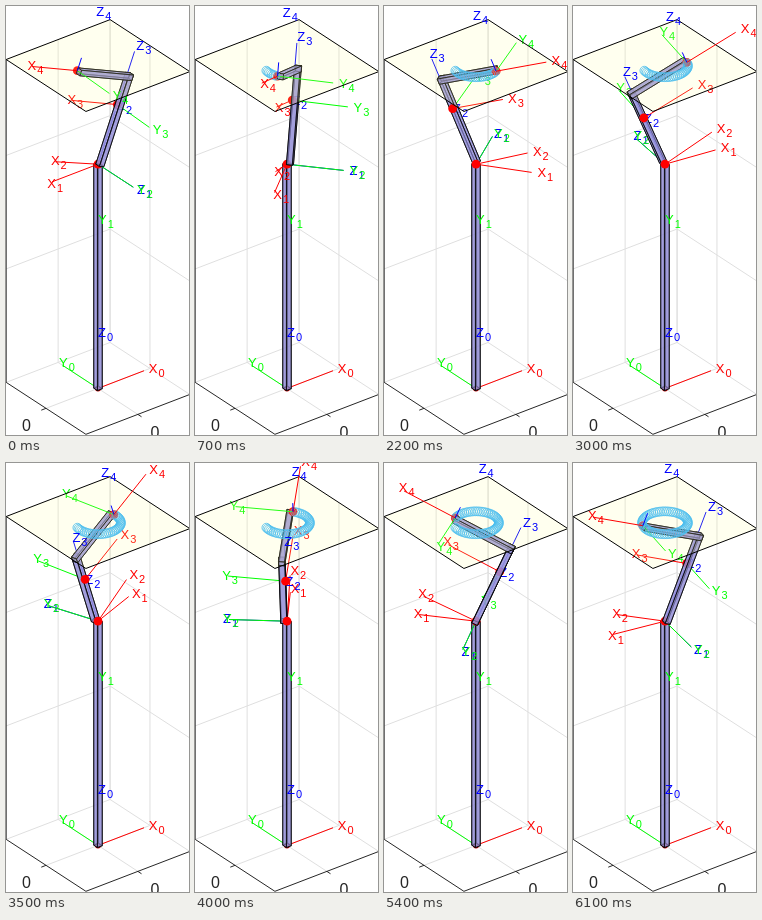
Recreate the animation shown at these times as an HTML page with a canvas. Size 183 by 429 pixels, loop 6200 ms.

```html
<!DOCTYPE html>
<html lang="en">
<head>
<meta charset="utf-8">
<title>Robot arm tracing a circle</title>
<style>
html, body { margin: 0; width: 100%; height: 100%; overflow: hidden; background: #fff; }
canvas { display: block; width: 183px; height: 429px; }
</style>
</head>
<body>
<canvas id="stage"></canvas>
<script>
const W = 183, H = 429, STEP = 100, STEPS = 62;
const RAD = Math.PI / 180;
const HALF = 65.5, TOP = 372.8, SHOULDER = 258.9;
const TILT = 22 * RAD, TWIST = -4.3 * RAD;
const SLIDE = 65, REACH = 97, TOOL = 63.5;
const AXIS = 58, LABEL = 64, THICK = 3, ASIDE = 3;
const RED = '#f00', GREEN = '#0f0', BLUE = '#00f';

const canvas = document.getElementById('stage');
const ctx = canvas.getContext('2d');
const ratio = window.devicePixelRatio || 1;
canvas.width = W * ratio;
canvas.height = H * ratio;
ctx.scale(ratio, ratio);

// Orthographic view: azimuth -37.5, elevation 30
const CA = Math.cos(37.5 * RAD), SA = Math.sin(37.5 * RAD);
const project = ([x, y, z]) => [
  92 + CA * x - SA * y,
  382.4 - 0.5 * (SA * x + CA * y) - 0.866 * z
];
// Distance away from the viewer
const depth = ([x, y, z]) => 0.866 * (SA * x + CA * y) - 0.5 * z;

const add = (p, v, k = 1) => p.map((c, i) => c + v[i] * k);
const mix = (a, u, b, v) => u.map((c, i) => a * c + b * v[i]);

function path(points, closed) {
  ctx.beginPath();
  points.forEach(p => ctx.lineTo(...project(p)));
  if (closed) ctx.closePath();
}

function line(p, q, color) {
  path([p, q]);
  ctx.strokeStyle = color;
  ctx.lineWidth = 1;
  ctx.stroke();
}

function dot(p, color = RED, r = 4.4) {
  ctx.beginPath();
  ctx.arc(...project(p), r, 0, 2 * Math.PI);
  ctx.fillStyle = color;
  ctx.fill();
}

function label(p, dir, letter, index, color) {
  const [x, y] = project(add(p, dir, LABEL));
  ctx.fillStyle = color;
  ctx.textAlign = 'left';
  ctx.textBaseline = 'alphabetic';
  ctx.font = '13px "Liberation Sans", Arial, sans-serif';
  ctx.fillText(letter, x, y + 4);
  const w = ctx.measureText(letter).width;
  ctx.font = '11px "Liberation Sans", Arial, sans-serif';
  ctx.fillText(index, x + w + 1, y + 8);
}

function axis(p, dir, letter, index, color, length = AXIS) {
  line(p, add(p, dir, length), color);
  label(p, dir, letter, index, color);
}

const FACES = ['0123', '4567', '0154', '1265', '2376', '3047'];

function beam(p, q, u, v) {
  const ring = c => [[1, 1], [1, -1], [-1, -1], [-1, 1]]
    .map(([a, b]) => add(add(c, u, a * THICK), v, b * THICK));
  const corners = [...ring(p), ...ring(q)];
  const far = face => face.reduce((sum, c) => sum + depth(c), 0);
  const faces = FACES.map(f => [...f].map(i => corners[i]));
  faces.sort((a, b) => far(b) - far(a));
  for (const face of faces) {
    path(face, true);
    ctx.fillStyle = 'rgba(150,145,215,.65)';
    ctx.fill();
    ctx.strokeStyle = '#000';
    ctx.lineWidth = 0.8;
    ctx.stroke();
  }
}

function room() {
  const h = HALF, grid = '#dfdfdf';
  for (const s of [0, h]) {
    line([s, -h, 0], [s, h, 0], grid);
    line([-h, s, 0], [h, s, 0], grid);
    line([s, h, 0], [s, h, TOP], grid);
    line([h, s, 0], [h, s, TOP], grid);
  }
  line([h, -h, 0], [h, -h, TOP], grid);
  for (let z = 2 * h; z < TOP; z += 2 * h) {
    line([-h, h, z], [h, h, z], grid);
    line([h, h, z], [h, -h, z], grid);
  }
  const ink = '#262626';
  line([-h, h, 0], [-h, -h, 0], ink);
  line([-h, -h, 0], [h, -h, 0], ink);
  line([-h, h, 0], [-h, h, TOP], ink);
  line([-h, 0, 0], [-h - 6, 0, 0], ink);
  line([0, -h, 0], [0, -h - 6, 0], ink);
  ctx.fillStyle = ink;
  ctx.textAlign = 'center';
  ctx.textBaseline = 'middle';
  ctx.font = '16px "Liberation Sans", Arial, sans-serif';
  ctx.fillText('0', 20.5, 420.5);
  ctx.fillText('0', 149, 428);
}

function plane() {
  const h = HALF;
  path([[h, h, TOP], [h, -h, TOP], [-h, -h, TOP], [-h, h, TOP]], true);
  ctx.fillStyle = 'rgba(255,255,150,.15)';
  ctx.fill();
  ctx.strokeStyle = '#000';
  ctx.lineWidth = 1;
  ctx.stroke();
}

const BASE = [0, 0, 0], J1 = [0, 0, SHOULDER], UP = [0, 0, 1];

// Joint positions and directions for one step
function pose(n) {
  const turn = Math.PI + n * 0.1;
  const x1 = [Math.cos(turn), Math.sin(turn), 0];
  const y2 = [-x1[1], x1[0], 0];
  const x2 = mix(Math.cos(TILT), x1, Math.sin(TILT), UP);
  const z2 = mix(-Math.sin(TILT), x1, Math.cos(TILT), UP);
  const x3 = mix(Math.cos(TWIST), x2, Math.sin(TWIST), y2);
  const y3 = mix(-Math.sin(TWIST), x2, Math.cos(TWIST), y2);
  const j3 = add(J1, z2, SLIDE);
  const elbow = add(J1, z2, REACH);
  return { x1, x2, y2, z2, x3, y3, j3, elbow, tip: add(elbow, x3, TOOL) };
}

function draw(n) {
  const a = pose(n);
  // The links sit beside the joint axes, so they hide the joints on half the turn
  const jointsInFront = depth(a.y2) > 0;
  const foot = add(J1, a.y2, ASIDE);
  const bend = add(a.elbow, a.y2, ASIDE);
  const hand = add(a.tip, a.y3, ASIDE);
  const joints = () => [J1, a.j3, a.tip].forEach(p => dot(p));

  ctx.fillStyle = '#fff';
  ctx.fillRect(0, 0, W, H);
  room();

  axis(BASE, [1, 0, 0], 'X', 0, RED);
  axis(BASE, [0, 1, 0], 'Y', 0, GREEN);
  line(J1, add(J1, UP, -AXIS), GREEN);
  dot(BASE, '#c00000', 3);
  beam(BASE, J1, [1, 0, 0], [0, 1, 0]);
  label(BASE, UP, 'Z', 0, BLUE);
  label(J1, [0, 0, -1], 'Y', 1, GREEN);

  axis(J1, a.x1, 'X', 1, RED);
  axis(J1, a.x2, 'X', 2, RED);
  axis(J1, a.y2, 'Z', 1, BLUE);
  axis(J1, a.y2, 'Y', 2, GREEN);
  axis(J1, a.z2, 'Z', 2, BLUE);
  axis(a.j3, a.x3, 'X', 3, RED);
  axis(a.j3, a.y3, 'Y', 3, GREEN);
  line(a.j3, add(a.j3, a.z2, AXIS), BLUE);

  if (!jointsInFront) joints();
  beam(foot, add(bend, a.z2, 3), a.x2, a.y2);
  beam(add(bend, a.x3, -3), hand, a.z2, a.y3);
  if (jointsInFront) joints();

  axis(a.tip, a.y3, 'Y', 4, GREEN);
  plane();

  ctx.strokeStyle = '#4dbeee';
  ctx.lineWidth = 0.8;
  for (let k = 0; k < n; k++) {
    ctx.beginPath();
    ctx.arc(...project(pose(k).tip), 4.4, 0, 2 * Math.PI);
    ctx.stroke();
  }

  label(a.j3, a.z2, 'Z', 3, BLUE);
  axis(a.tip, a.x3, 'X', 4, RED);
  axis(a.tip, a.z2, 'Z', 4, BLUE, 14);
}

let start = null, shown = -1;
function tick(now) {
  if (start === null) start = now;
  const n = Math.floor((now - start) / STEP) % STEPS;
  if (n !== shown) draw(shown = n);
  requestAnimationFrame(tick);
}
draw(0);
requestAnimationFrame(tick);
</script>
</body>
</html>
```
